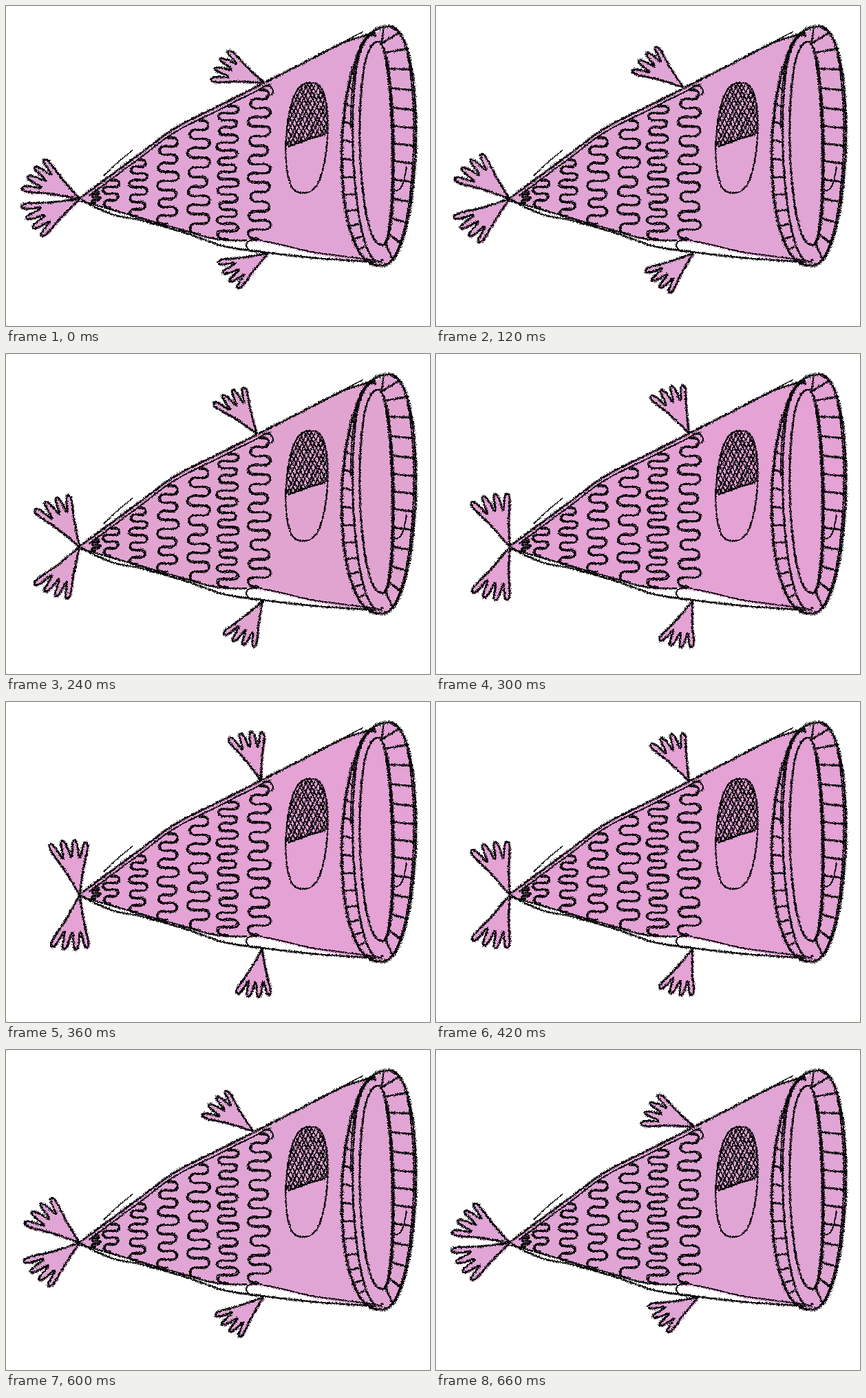
Animation of 616x466 px, one loop 720 ms. Source, as an HTML page with a canvas:

```html
<!DOCTYPE html>
<html lang="en">
<head>
<meta charset="utf-8">
<title>Swimming fish</title>
<style>
html, body { margin: 0; width: 100%; height: 100%; overflow: hidden; background: #fff; }
canvas { display: block; }
</style>
</head>
<body>
<canvas id="stage" width="616" height="466"></canvas>
<script>
const W = 616, H = 466, INK = '#0c0a0c', RAD = Math.PI / 180;
const PINKS = ['#e0a5d5', '#e0a5d4', '#e1a4d3', '#e1a4d1', '#e4a2d5', '#e4a2d5'];

let seed = 1;
const rnd = () => {
  seed = (seed * 1664525 + 1013904223) % 4294967296;
  return seed / 4294967296;
};

function layer() {
  const c = document.createElement('canvas');
  c.width = W;
  c.height = H;
  return c;
}

// Smooth curve through points
function curve(pts) {
  const out = [], at = i => pts[Math.max(0, Math.min(pts.length - 1, i))];
  for (let i = 0; i < pts.length - 1; i++) {
    const [a, b, c, d] = [at(i - 1), at(i), at(i + 1), at(i + 2)];
    const steps = Math.max(2, Math.ceil(Math.hypot(c[0] - b[0], c[1] - b[1]) / 2));
    for (let s = 0; s < steps; s++) {
      const t = s / steps;
      out.push([0, 1].map(k => b[k] + t / 2 * (c[k] - a[k] +
        t * (2 * a[k] - 5 * b[k] + 4 * c[k] - d[k] + t * (3 * (b[k] - c[k]) + d[k] - a[k])))));
    }
  }
  out.push(at(pts.length - 1));
  return out;
}

// Grainy crayon line
function crayon(g, pts, w, color = INK, density = 2.2) {
  g.fillStyle = color;
  for (let i = 1; i < pts.length; i++) {
    const [x, y] = pts[i - 1], dx = pts[i][0] - x, dy = pts[i][1] - y;
    const dots = Math.hypot(dx, dy) * w * density;
    for (let k = 0; k < dots; k++) {
      const t = rnd(), r = (rnd() + rnd() - 1) * w * 0.85, a = rnd() * 2 * Math.PI;
      g.fillRect(Math.round(x + dx * t + r * Math.cos(a) - 0.5),
                 Math.round(y + dy * t + r * Math.sin(a) - 0.5), 1, 1);
    }
  }
}

const line = (g, w, ...pts) => crayon(g, curve(pts), w);

function trace(g, pts) {
  g.beginPath();
  pts.forEach(p => g.lineTo(...p));
  g.closePath();
}

function fillRough(g, pts, color) {
  g.fillStyle = color;
  trace(g, pts);
  g.fill();
  crayon(g, pts, 4, color, 0.6);
}

// Lopsided oval: separate left and right radii, leaning along its height
function onOval(o, deg) {
  const c = Math.cos(deg * RAD), s = Math.sin(deg * RAD);
  const side = c < 0 ? -o.left : o.right;
  return [o.x - o.lean * s + side * Math.abs(c) ** o.power, o.y + o.ry * s];
}

function arc(o, from = 0, to = 360) {
  const pts = [];
  for (let a = from; a <= to; a += 2) pts.push(onOval(o, a));
  return pts;
}

const RIM = { x: 550, y: 204, left: 62, right: 45, ry: 174, lean: 5, power: 0.85 };
const BAND = { x: 538, y: 207, left: 34, right: 20, ry: 165, lean: -5, power: 0.85 };
const LIP = { x: 544, y: 200, left: 30, right: 17, ry: 148, lean: -3, power: 0.85 };
const EYE = { x: 437, y: 192, left: 30, right: 30, ry: 80, lean: 5, power: 0.7 };

// Body edges by x
const roof = x => 178 - (x - 245) * (x < 245 ? 0.74 : 0.508);
const base = x => Math.min(341, 283 + 0.29 * (x - 107));

// Column of scales: one meandering line from back to belly
function scales(g, x, period, amp) {
  const y0 = roof(x) + 6, y1 = base(x) - 2, n = Math.round((y1 - y0) / period);
  const pitch = (y1 - y0) / n;
  [2.9, 1.6].forEach((w, pass) => {
    const pts = [];
    for (let a = 0; a <= n; a += 0.012) {
      const q = a * 2 * Math.PI, sway = 0.93 + 0.12 * Math.sin(q * 0.37 + x);
      pts.push([x + amp * Math.sin(q) * sway + pass * 2 * Math.sin(q * 0.21),
                y0 + pitch * (a - 0.1 * Math.sin(2 * q)) + pass * 2 * Math.cos(q * 0.3)]);
    }
    crayon(g, pts, w);
  });
}

function drawEye(g) {
  const rim = arc(EYE);
  g.save();
  trace(g, rim);
  g.clip();
  trace(g, [[400, 100], [470, 100], [470, 185], [400, 208]]);
  g.clip();
  for (let x = 330; x < 480; x += 6) {
    const j = rnd() * 3;
    crayon(g, [[x + j, 210], [x + 52, 105]], 2.2);
    crayon(g, [[x + j, 105], [x + 60, 210]], 1.9);
  }
  g.restore();
  crayon(g, rim, 2.3);
  line(g, 3, [411, 205], [436, 195], [463, 187]);
}

function drawMouth(g) {
  crayon(g, arc(RIM), 4.2);
  crayon(g, arc({ ...RIM, right: 42 }, -50, 80), 2);
  crayon(g, arc(BAND, 80, 280), 3);
  crayon(g, arc({ ...BAND, left: 37 }, 190, 280), 1.8);
  crayon(g, arc(LIP), 3.2);
  crayon(g, arc({ ...LIP, right: 19 }, -60, 90), 3.6);
  line(g, 2, [582, 234], [577, 258], [570, 268], [560, 267]);

  // Right ribs fan out towards both ends
  for (let i = -6; i <= 6; i++) {
    const u = i / 6, a = 72 * (0.7 * u + 0.3 * u ** 3), s = Math.sin(a * RAD);
    const inner = Math.asin(1.17 * s - 0.17 * s ** 5) / RAD;
    line(g, 3.3, onOval(RIM, a), onOval(LIP, inner));
  }
  for (let a = 120; a <= 245; a += 9) {
    line(g, 2.9, onOval(RIM, a), onOval(BAND, a));
  }
  line(g, 2.7, [548, 34], [546, 54]);
}

function drawBody(g) {
  seed = 7;
  const back = [107, 150, 200, 245, 310, 375, 440, 490].map(x => [x, roof(x)]);
  const inner = [120, 190, 245, 310, 384].map(x => [x, roof(x) + 6]);
  line(g, 3.3, ...back, [536, 39]);
  line(g, 2.2, ...inner);
  line(g, 1.4, [142, 247], [160, 230], [184, 210]);
  line(g, 1.6, [480, 59], [500, 47], [518, 38]);

  const belly = [107, 150, 200, 240, 290, 322, 350].map(x => [x, base(x)]);
  line(g, 2.8, ...belly);
  line(g, 3, [107, 281], [150, 302], [200, 313], [262, 331], [318, 350], [380, 359], [450, 367], [538, 373]);
  line(g, 2, [374, 342], [410, 350], [450, 359], [535, 370]);

  scales(g, 130, 12, 6);
  scales(g, 152, 18, 12);
  scales(g, 192, 20, 13);
  scales(g, 235, 26, 15);
  scales(g, 280, 28, 16);
  scales(g, 322, 21.5, 15);
  scales(g, 368, 28, 16);
  line(g, 2.5, [372, 116], [384, 117], [388, 127], [377, 132]);
  line(g, 2.4, [372, 341], [356, 341], [349, 348], [355, 356], [370, 357]);

  drawEye(g);
  drawMouth(g);
}

const SKIN = [[107, 281], [245, 178], [375, 112], [490, 54], [530, 42], ...arc(RIM, -88, 92),
  [528, 373], [450, 361], [385, 345], [345, 340], [318, 342], [240, 322]];

// Angles run from the leftward axis, side -1 is up; hop and drift are [x, y, turn]
const FINS = [
  { x: 375, y: 112, side: -1, size: 77, from: 2, spread: 41, hop: [-19.5, 7, 5.5], drift: [3, -1, 8.8] },
  { x: 381, y: 360, side: 1, size: 74, from: 9, spread: 41, hop: [-7, 0, 0], drift: [-0.4, 0, 10] },
  { x: 107, y: 281, side: -1, size: 85, from: 9, spread: 40, hop: [0, 0, 0], drift: [0, 0, 9.8] },
  { x: 107, y: 281, side: 1, size: 85, from: 6, spread: 39, hop: [0, 0, 0], drift: [0, 0, 10.8] }
];

// Fin outline as [radius, position across the spread]: four fingers on a wedge
const HAND = [[0, 0], [0.5, 0.02]];
for (let k = 0; k < 4; k++) {
  const c = 0.04 + k * 0.305;
  HAND.push([0.88, c - 0.07], [0.99, c - 0.03], [1, c + 0.04], [0.89, c + 0.09]);
  if (k < 3) HAND.push([0.72, c + 0.12], [0.71, c + 0.17]);
}
HAND.push([0.5, 1], [0, 1]);

function drawFin(g, f, pose, pink) {
  const [x, y, a0] = [f.x, f.y, f.from].map((v, i) => v + (pose ? f.hop[i] + f.drift[i] * pose : 0));
  const pts = curve(HAND.map(([r, u]) => {
    const a = (a0 + f.spread * u) * RAD, d = r * f.size * (1 - 0.1 * u);
    return [x - d * Math.cos(a), y + f.side * d * Math.sin(a)];
  }));
  seed = 31 + pose;
  fillRough(g, pts.map(p => [p[0] + 1, p[1] + 1]), pink);
  crayon(g, pts, 3.3);
}

const ink = layer();
drawBody(ink.getContext('2d'));

const poses = PINKS.map((pink, i) => {
  const c = layer(), g = c.getContext('2d');
  g.fillStyle = '#fff';
  g.fillRect(0, 0, W, H);
  seed = 90 + i;
  fillRough(g, SKIN, pink);
  g.drawImage(ink, 0, 0);
  FINS.forEach(f => drawFin(g, f, i, pink));
  return c;
});

// Swing out and back in eleven steps, resting twice as long at the start
const view = document.getElementById('stage').getContext('2d');
function tick() {
  const step = Math.max(0, Math.floor(performance.now() % 720 / 60) - 1);
  view.drawImage(poses[5 - Math.abs(step - 5)], 0, 0);
  requestAnimationFrame(tick);
}
tick();
</script>
</body>
</html>
```
